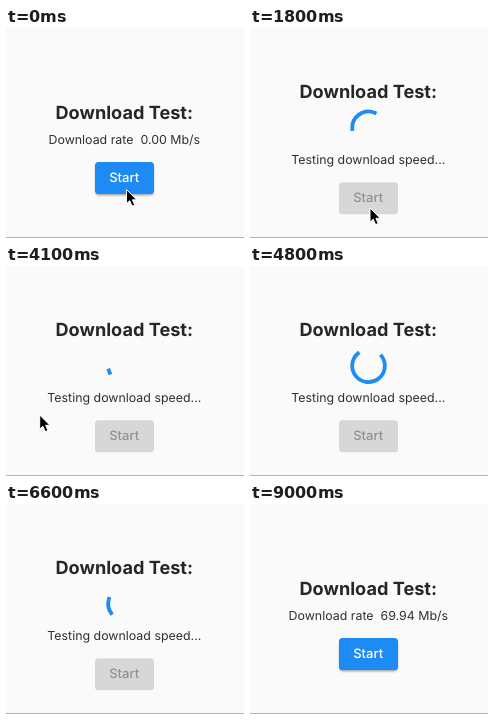
An HTML page for the animation above (9500 ms loop, 238 by 210 pixels).

```html
<!DOCTYPE html>
<html lang="en">
<head>
<meta charset="utf-8">
<title>Download test</title>
<style>
html, body { margin: 0; width: 100%; height: 100%; overflow: hidden; background: #fafafa; }
svg { display: block; width: 238px; height: 210px; }
text { font-family: Inter, Roboto, sans-serif; text-anchor: middle; white-space: pre; fill: #262626; text-rendering: geometricPrecision; }
.title { font-size: 18.15px; font-weight: 700; }
.body { font-size: 12.4px; fill: #303030; }
.label { font-size: 13px; font-weight: 550; }
.ring { fill: none; stroke: #1e8cf2; stroke-width: 3.8; stroke-linecap: square; }
.edge { fill: #b4b4b4; }
.shadow { fill: #000; filter: blur(1.3px); }
</style>
</head>
<body>
<svg viewBox="0 0 238 210">
  <rect class="edge" y="209" width="238" height="1"/>
  <g id="page">
    <text class="title" x="118.3" y="70.1">Download Test:</text>
    <path class="ring" id="ring"/>
    <text class="body" id="info" x="118.3"></text>
    <g id="button">
      <rect class="shadow" id="shadow" x="89.5" y="135.8" width="58" height="31.5" rx="3.5"/>
      <rect id="face" x="89" y="134" width="59" height="32" rx="3.6"/>
      <text class="label" id="label" x="118.2" y="154">Start</text>
    </g>
  </g>
  <path id="cursor" d="M0 0V14.2L3.2 11.2L5.6 16.6L8.2 15.5L5.9 10.3H10.2Z"
        fill="#000" stroke="#fff" stroke-width="1" stroke-linejoin="round"/>
</svg>
<script>
const LOOP = 9500, STEP = 100, BEGIN = 400, DONE = 8200;
const SPIN_ZERO = 251, SWEEP_MS = 1333, TURN_MS = 2222;
const CX = 118.5, CY = 99.8, R = 16.3;
const $ = id => document.getElementById(id);
const clamp = x => Math.min(1, Math.max(0, x));
const mix = (a, b, k) => a + (b - a) * k;
const rgb = (a, b, k) => `rgb(${a.map((v, i) => Math.round(mix(v, b[i], k)))})`;

// Pointer path: time, x, y
const trail = [
  [0, 120.5, 161.5], [500, 120.5, 161.5], [800, 120.5, 159.5], [1000, 121, 165],
  [1300, 132, 188], [1500, 147, 191], [1800, 120, 180], [2100, 70, 150],
  [2400, 39, 134], [2700, 37.7, 131], [3200, 33.7, 149], [4100, 33.7, 149],
  [4300, 67, 166], [4500, 82, 192], [4700, 90, 212]
];

// Cubic bezier (.4, 0, .2, 1)
function ease(x) {
  let lo = 0, hi = 1;
  for (let i = 0; i < 24; i++) {
    const s = (lo + hi) / 2, q = 1 - s;
    if (1.2 * q * q * s + 0.6 * q * s * s + s ** 3 < x) lo = s; else hi = s;
  }
  return lo * lo * (3 - 2 * lo);
}

function arc(t) {
  const u = t - SPIN_ZERO, p = u / SWEEP_MS % 1;
  const head = ease(clamp(p * 2)), tail = ease(clamp(p * 2 - 1));
  const start = -90 + tail * 270 + u / TURN_MS * 360 + p * 90;
  const sweep = Math.max((head - tail) * 270, 0.1);
  const at = deg => {
    const a = deg * Math.PI / 180;
    return `${(CX + R * Math.cos(a)).toFixed(3)} ${(CY + R * Math.sin(a)).toFixed(3)}`;
  };
  return `M${at(start)}A${R} ${R} 0 ${sweep > 180 ? 1 : 0} 1 ${at(start + sweep)}`;
}

function movePointer(t) {
  const i = trail.findIndex(p => p[0] > t);
  $('cursor').style.display = i < 0 ? 'none' : '';
  if (i < 0) return;
  const [t0, x0, y0] = trail[i - 1], [t1, x1, y1] = trail[i];
  const k = (t - t0) / (t1 - t0);
  $('cursor').setAttribute('transform', `translate(${mix(x0, x1, k)} ${mix(y0, y1, k)})`);
}

function draw(t) {
  const busy = t >= BEGIN && t < DONE;
  const off = t < DONE ? clamp((t - BEGIN + 150) / 200) * (t >= BEGIN) : clamp((DONE + 100 - t) / 200);
  $('page').setAttribute('transform', `translate(0 ${busy ? 0 : 20.5})`);
  $('button').setAttribute('transform', `translate(0 ${busy ? 20.3 : -20.5})`);
  $('ring').style.display = busy ? '' : 'none';
  if (busy) $('ring').setAttribute('d', arc(t));
  $('info').setAttribute('y', busy ? 136.2 : 95.3);
  $('info').textContent = busy ? 'Testing download speed...'
    : `Download rate\u00a0 ${t < BEGIN ? '0.00' : '69.94'} Mb/s`;
  $('face').style.fill = rgb([30, 138, 243], [215, 215, 215], off);
  $('label').style.fill = rgb([255, 255, 255], [146, 146, 146], off);
  $('shadow').style.opacity = 0.38 * (1 - off);
  movePointer(t);
}

function tick() {
  const t = performance.now() % LOOP;
  draw(Math.floor(t / STEP) * STEP);
  requestAnimationFrame(tick);
}
tick();
</script>
</body>
</html>
```
